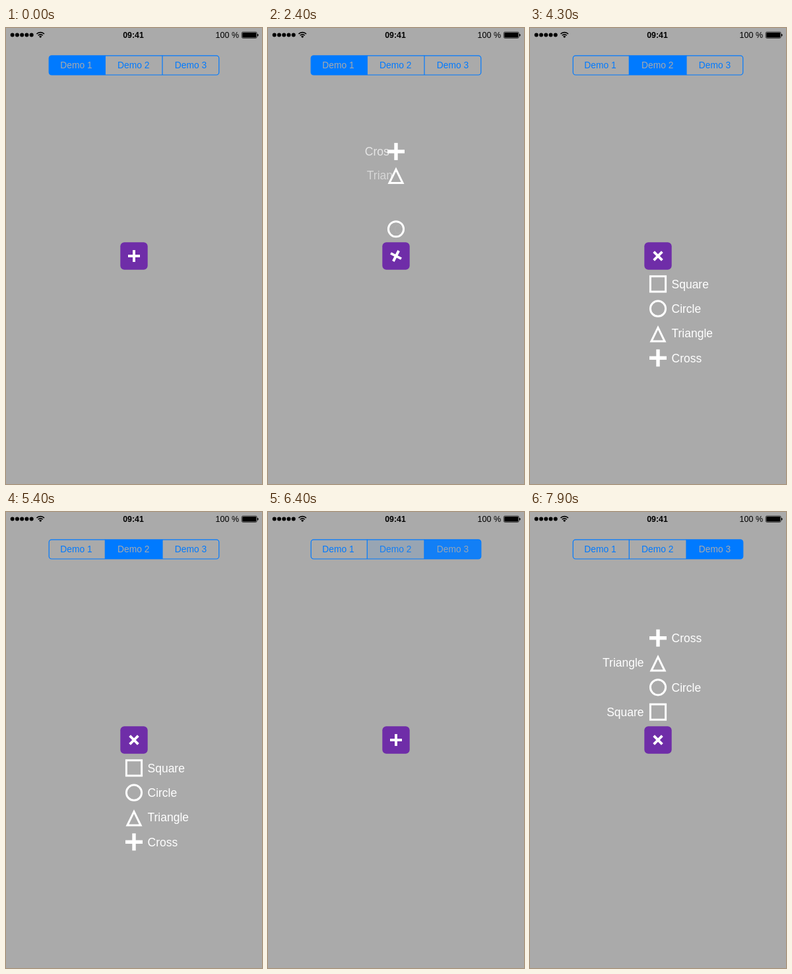
Animation, 388 px wide and 690 px high, one loop 8000 ms. Source, as an HTML page with a canvas:

```html
<!DOCTYPE html>
<html lang="en">
<head>
<meta charset="utf-8">
<title>Expanding menu demo</title>
<style>
html, body { margin: 0; width: 100%; height: 100%; overflow: hidden; background: #aaa; }
canvas { display: block; width: 388px; height: 690px; }
</style>
</head>
<body>
<canvas id="stage"></canvas>
<script>
const W = 388, H = 690, LOOP = 8000;
const GRAY = [170, 170, 170], BLUE = [0, 122, 255], PURPLE = '#6f2da8';
const FONT = '"Liberation Sans", Arial, sans-serif';
const CX = 194, CY = 345;
const NAMES = ['Square', 'Circle', 'Triangle', 'Cross'];

// dir: -1 opens upwards; sides: -1 puts the label left of its icon
const MENUS = [
  { open: 1098, close: 2229, dir: -1, sides: [-1, -1, -1, -1] },
  { open: 3670, close: 5435, dir: 1, sides: [1, 1, 1, 1] },
  { open: 7140, close: Infinity, dir: -1, sides: [-1, 1, -1, 1] }
];
const SWITCHES = [3140, 6240];
const OPEN_STEP = 100, CLOSE_STEP = 50, CLOSE_TIME = 142;

const canvas = document.getElementById('stage');
const ctx = canvas.getContext('2d');
const dpr = window.devicePixelRatio || 1;
canvas.width = W * dpr;
canvas.height = H * dpr;

const clamp = v => Math.max(0, Math.min(1, v));
const smooth = v => { v = clamp(v); return v * v * (3 - 2 * v); };
const rgb = c => `rgb(${c.map(Math.round).join(',')})`;
const mix = (a, b, k) => a.map((v, i) => v + (b[i] - v) * k);

function track(points, u) {
  if (u <= points[0][0]) return points[0][1];
  for (let i = 1; i < points.length; i++) {
    const [u0, v0] = points[i - 1], [u1, v1] = points[i];
    if (u <= u1) return v0 + (v1 - v0) * (u - u0) / (u1 - u0);
  }
  return points[points.length - 1][1];
}

const BOUNCE = [[0, 0], [0.35, 1.04], [0.72, 0.985], [1, 1]];
const LABEL_OUT = [[0, 1], [0.15, 0.706], [0.5, 0.536], [0.857, 0.05], [1, 0]];
const backIn = u => u * u * (2.4 * u - 1.4);

function text(str, x, y, size, color, align = 'left', weight = '') {
  ctx.font = `${weight} ${size}px ${FONT}`;
  ctx.textAlign = align;
  ctx.fillStyle = color;
  ctx.fillText(str, x, y);
}

function disc(x, y, r) {
  ctx.beginPath();
  ctx.arc(x, y, r, 0, Math.PI * 2);
  ctx.fill();
}

function box(x, y, w, h, r) {
  ctx.beginPath();
  ctx.roundRect(x, y, w, h, r);
}

function plus(size, thick) {
  ctx.fillRect(-size / 2, -thick / 2, size, thick);
  ctx.fillRect(-thick / 2, -size / 2, thick, size);
}

function drawStatus() {
  ctx.fillStyle = ctx.strokeStyle = '#000';
  for (let i = 0; i < 5; i++) disc(9.7 + i * 7.25, 10.6, 3);

  const a = Math.PI * 0.25;
  ctx.lineWidth = 1.7;
  for (const r of [5, 8.2]) {
    ctx.beginPath();
    ctx.arc(52.2, 14.8, r, -Math.PI + a, -a);
    ctx.stroke();
  }
  ctx.beginPath();
  ctx.moveTo(52.2, 15);
  ctx.arc(52.2, 15, 3, -Math.PI + a, -a);
  ctx.fill();

  text('09:41', 193, 15, 12.3, '#000', 'center', 'bold');
  text('100 %', 317.6, 15, 12.5, '#000');

  ctx.lineWidth = 0.7;
  box(357.4, 6, 22.8, 9.4, 1.8);
  ctx.stroke();
  box(358.3, 6.9, 21, 7.6, 1);
  ctx.fill();
  box(381, 9, 1.5, 3.6, [0, 1, 1, 0]);
  ctx.fill();
}

function drawTabs(t) {
  const [a, b] = SWITCHES.map(s => clamp((t - s) / 180));
  const weights = [1 - a, a - b, b];
  const edges = [65.2, 150.3, 237, 322.8];
  const top = 41.8, bottom = 71;

  ctx.save();
  box(65.2, top, 257.6, bottom - top, 4);
  ctx.clip();
  weights.forEach((w, i) => {
    ctx.globalAlpha = w;
    ctx.fillStyle = rgb(BLUE);
    ctx.fillRect(edges[i], top, edges[i + 1] - edges[i], bottom - top);
  });
  ctx.restore();

  ctx.strokeStyle = rgb(BLUE);
  ctx.lineWidth = 1.2;
  box(65.2, top, 257.6, bottom - top, 4);
  ctx.stroke();
  for (const x of edges.slice(1, 3)) {
    ctx.beginPath();
    ctx.moveTo(x, top);
    ctx.lineTo(x, bottom);
    ctx.stroke();
  }
  weights.forEach((w, i) =>
    text(`Demo ${i + 1}`, [106.5, 193.2, 280][i], 61.3, 13.8, rgb(mix(BLUE, GRAY, w)), 'center'));
}

function drawIcon(i, y) {
  ctx.save();
  ctx.translate(CX, y);
  ctx.strokeStyle = ctx.fillStyle = '#fff';
  ctx.lineWidth = 3;
  ctx.beginPath();
  if (i === 0) ctx.rect(-11.6, -11.6, 23.2, 23.2);
  if (i === 1) ctx.arc(0, 0, 11.6, 0, Math.PI * 2);
  if (i === 2) {
    ctx.moveTo(0, -8.6);
    ctx.lineTo(10.1, 12);
    ctx.lineTo(-10.1, 12);
    ctx.closePath();
  }
  if (i === 3) plus(26, 5.4);
  else ctx.stroke();
  ctx.restore();
}

// A label grows out of its icon and shows only the letters that fit
function drawLabel(str, side, y, p) {
  if (p <= 0) return;
  ctx.font = ` 17.5px ${FONT}`;
  const full = ctx.measureText(str).width;
  const home = side < 0 ? 172.6 - full : 214.5;
  const room = (full + 12) * p;
  let n = str.length;
  while (n > 1 && ctx.measureText(str.slice(0, n)).width > room) n--;
  ctx.globalAlpha = clamp(p);
  text(str.slice(0, n), CX + (home - CX) * p, y + 6.3, 17.5, '#fff');
  ctx.globalAlpha = 1;
}

function drawItems(menu, t) {
  const closing = t >= menu.close;
  for (let i = 3; i >= 0; i--) {
    let reach, label;
    if (closing) {
      const u = clamp((t - menu.close - i * CLOSE_STEP) / CLOSE_TIME);
      reach = 1 - backIn(u);
      label = track(LABEL_OUT, u);
    } else {
      const e = t - menu.open - i * OPEN_STEP;
      reach = track(BOUNCE, e / 300);
      label = clamp(e / 250);
    }
    if (reach <= 0) continue;
    const y = CY + menu.dir * (42.4 + 37.3 * i) * reach;
    drawLabel(NAMES[i], menu.sides[i], y, label);
    drawIcon(i, y);
  }
}

function drawButton(turn) {
  ctx.fillStyle = PURPLE;
  box(CX - 20.7, CY - 20.7, 41.4, 41.4, 6);
  ctx.fill();
  ctx.save();
  ctx.translate(CX, CY);
  ctx.rotate(turn * Math.PI / 4);
  ctx.fillStyle = '#fff';
  plus(18, 3.9);
  ctx.restore();
}

function draw(t) {
  ctx.setTransform(dpr, 0, 0, dpr, 0, 0);
  ctx.fillStyle = rgb(GRAY);
  ctx.fillRect(0, 0, W, H);
  drawStatus();
  drawTabs(t);
  let turn = 0;
  for (const menu of MENUS) {
    if (t < menu.open) continue;
    drawItems(menu, t);
    turn += smooth((t - menu.open) / 400) - smooth((t - menu.close) / 400);
  }
  drawButton(turn);
}

const start = performance.now();
function frame() {
  draw((performance.now() - start) % LOOP);
  requestAnimationFrame(frame);
}
frame();
</script>
</body>
</html>
```
